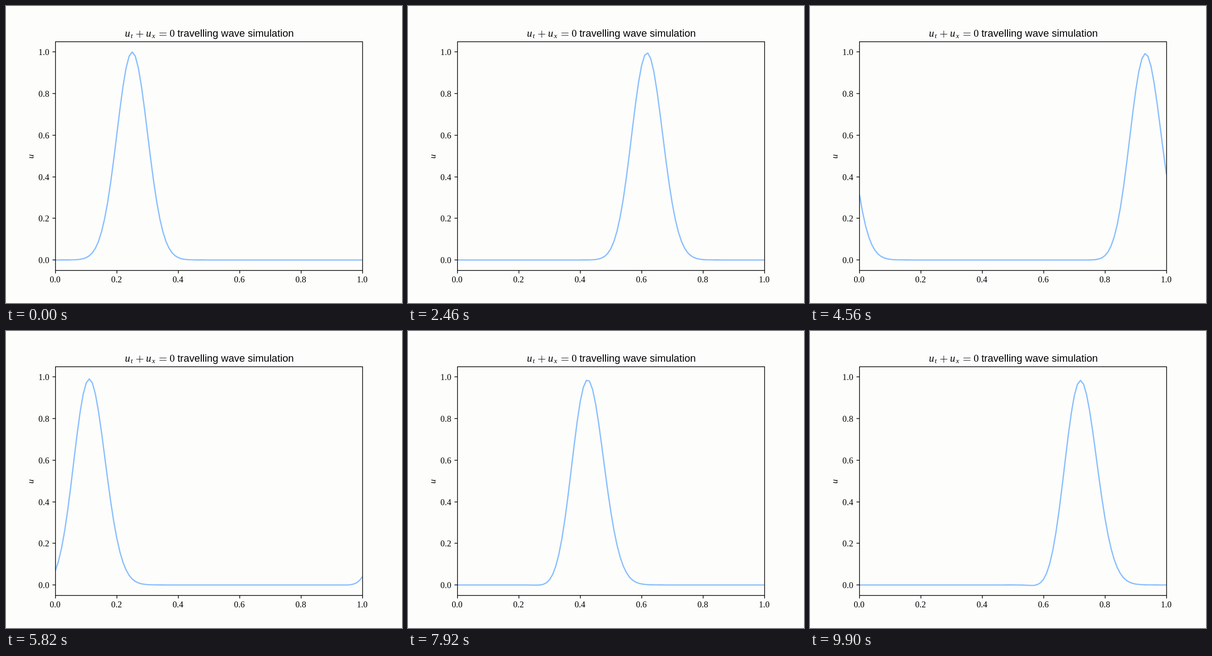
These frames come from a looping animation (864x648 px, 9.96 s). An HTML page with a canvas:

```html
<!DOCTYPE html>
<html lang="en">
<head>
<meta charset="utf-8">
<title>Travelling wave</title>
<style>
  html, body { margin: 0; width: 100%; height: 100%; overflow: hidden; background: #fdfdfc; }
  canvas { display: block; }
</style>
</head>
<body>
<canvas id="stage" width="864" height="648"></canvas>
<script>
const ctx = document.getElementById('stage').getContext('2d');
const SERIF = '"Liberation Serif", serif';
const SANS = '"Liberation Sans", sans-serif';
const STEP_MS = 60, STEPS = 166, POINTS = 101, COURANT = 0.9;

const xPix = x => 108 + 669.6 * x;
const yPix = u => 554.04 - 453.6 * u;

// Lax-Wendroff step for u_t + u_x = 0 on a periodic grid
function advance(u) {
  const c = COURANT;
  return u.map((v, i) => {
    const left = u[(i + POINTS - 1) % POINTS], right = u[(i + 1) % POINTS];
    return v - c / 2 * (right - left) + c * c / 2 * (right - 2 * v + left);
  });
}

const states = [Array.from({ length: POINTS }, (_, i) => Math.exp(-200 * (i / 100 - 0.25) ** 2))];
while (states.length < STEPS) states.push(advance(states.at(-1)));

function text(str, x, y, font, align = 'left') {
  ctx.font = font;
  ctx.textAlign = align;
  ctx.fillText(str, x, y);
}

function line(x1, y1, x2, y2) {
  ctx.beginPath();
  ctx.moveTo(x1, y1);
  ctx.lineTo(x2, y2);
  ctx.stroke();
}

function drawTitle() {
  const italic = `italic 22.5px ${SERIF}`, sub = `italic 15.5px ${SERIF}`;
  text('u', 259.6, 67, italic);
  text('t', 272.2, 70.4, sub);
  text('u', 305.4, 67, italic);
  text('x', 318.6, 70.4, sub);
  text('0', 357.1, 67, `22.5px ${SERIF}`);
  ctx.lineWidth = 1;
  line(284.2, 61.5, 299.6, 61.5);
  line(291.9, 53.8, 291.9, 69.2);
  line(334.8, 58.9, 350.2, 58.9);
  line(334.8, 64.1, 350.2, 64.1);
  text('travelling wave simulation', 373.9, 67, `22.3px ${SANS}`);
}

function drawAxes() {
  ctx.strokeStyle = ctx.fillStyle = '#000';
  ctx.lineWidth = 1.5;
  ctx.strokeRect(108, 78, 670, 499);
  for (let i = 0; i <= 5; i++) {
    const label = (i / 5).toFixed(1), font = `18.75px ${SERIF}`;
    const x = Math.round(xPix(i / 5)), y = Math.round(yPix(i / 5));
    line(x, 577, x, 583.56);
    line(108, y, 101.44, y);
    text(label, x - 0.8, 603.4, font, 'center');
    text(label, 94.3, y + 6.5, font, 'right');
  }
  ctx.save();
  ctx.translate(59.8, 333);
  ctx.rotate(-Math.PI / 2);
  text('u', 0, 0, `italic 18.75px ${SERIF}`);
  ctx.restore();
}

function drawWave(u) {
  ctx.save();
  ctx.beginPath();
  ctx.rect(108, 77.76, 669.6, 498.96);
  ctx.clip();
  ctx.strokeStyle = '#8abfff';
  ctx.lineWidth = 2.81;
  ctx.lineJoin = 'round';
  ctx.beginPath();
  u.forEach((v, i) => ctx.lineTo(xPix(i / 100), yPix(v)));
  ctx.stroke();
  ctx.restore();
}

function render(now) {
  ctx.fillStyle = '#fdfdfc';
  ctx.fillRect(0, 0, 864, 648);
  drawWave(states[Math.floor(now / STEP_MS) % STEPS]);
  drawAxes();
  drawTitle();
  requestAnimationFrame(render);
}
requestAnimationFrame(render);
</script>
</body>
</html>
```
